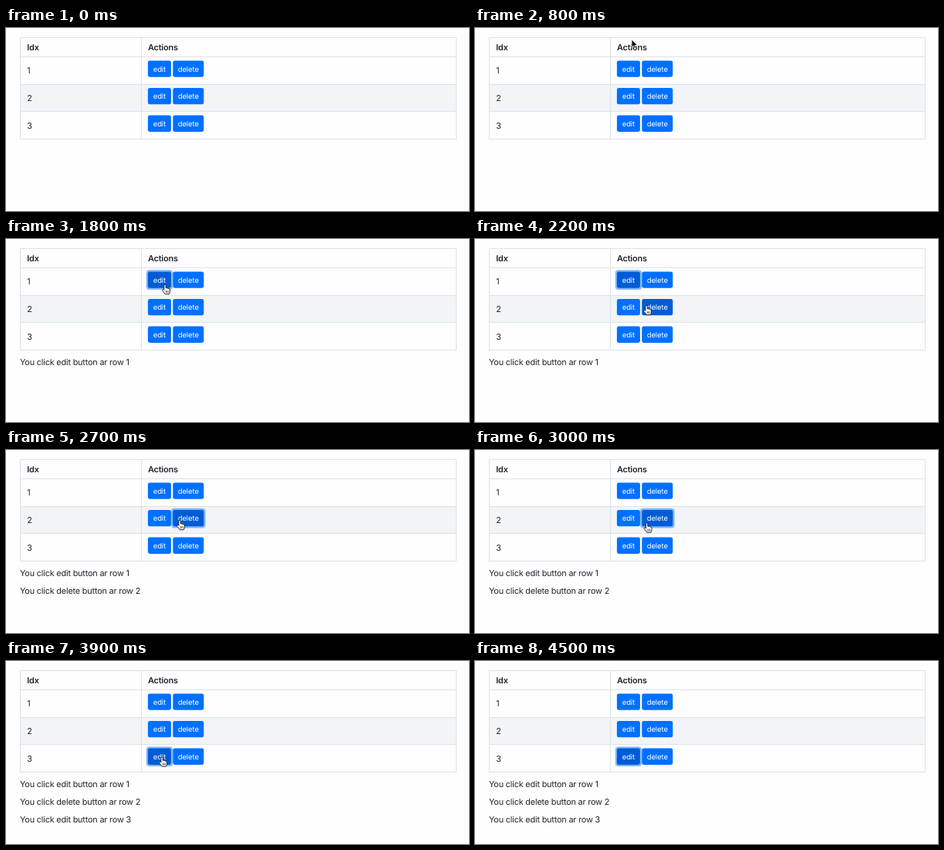
Write an HTML page that moves like this. It is 600 px wide and 238 px high and loops after 4900 ms.

```html
<!DOCTYPE html>
<html lang="en">
<head>
<meta charset="utf-8">
<title>Table actions</title>
<style>
  html, body { margin: 0; width: 100%; height: 100%; overflow: hidden; background: #fefdff; }
  svg { display: block; width: 600px; height: 238px; }
  text {
    font: 10.9px Inter, Roboto, sans-serif;
    letter-spacing: -.2px;
    fill: #212529;
    text-rendering: geometricPrecision;
  }
  .head { font-weight: 600; }
  .label { font-size: 9.5px; letter-spacing: -.1px; fill: #fff; text-anchor: middle; }
  .grid { fill: none; stroke: #dbe4e8; }
  .stripe { fill: #f2f4f7; }
  .button { fill: #0070ff; }
  .button.active { fill: #005cd6; }
  .ring { fill: #0070ff; fill-opacity: .48; }
  .cursor { stroke-linejoin: round; stroke-linecap: round; }
</style>
</head>
<body>
<svg id="stage" viewBox="0 0 600 238"></svg>
<script>
const LOOP = 4900;
const STEP = 100;
const ROWS = 3;
const ROW_HEIGHT = 35.6;
const stage = document.getElementById('stage');

function add(tag, attrs, parent = stage) {
  const node = document.createElementNS('http://www.w3.org/2000/svg', tag);
  for (const key in attrs) node.setAttribute(key, attrs[key]);
  parent.append(node);
  return node;
}

function write(x, y, content, cls = '') {
  const node = add('text', { x, y, class: cls });
  node.textContent = content;
  return node;
}

const show = (node, on) => node.setAttribute('visibility', on ? 'visible' : 'hidden');

// Table
const lineY = i => Math.round(37.1 + ROW_HEIGHT * i) + .5;
add('rect', { x: 18, y: lineY(1), width: 566, height: lineY(2) - lineY(1), class: 'stripe' });
let grid = `M18.5 12.5H583.5V${lineY(ROWS)}H18.5ZM175.5 12.5V${lineY(ROWS)}`;
for (let i = 0; i < ROWS; i++) grid += `M18.5 ${lineY(i)}H583.5`;
add('path', { d: grid, class: 'grid' });
write(27.3, 29.4, 'Idx', 'head');
write(184, 29.4, 'Actions', 'head');

// Buttons, keyed by action and row
const actions = [
  { name: 'edit', x: 183.9, width: 30 },
  { name: 'delete', x: 216.3, width: 40 }
];
const buttons = [];
for (let row = 1; row <= ROWS; row++) {
  const y = 42.4 + (row - 1) * ROW_HEIGHT;
  const height = 21.3;
  const spread = 2.2;
  write(27.3, y + 16.9, row);
  for (const { name, x, width } of actions) {
    const ring = add('rect', {
      x: x - spread, y: y - spread, width: width + 2 * spread, height: height + 2 * spread,
      rx: 4, class: 'ring'
    });
    const face = add('rect', { x, y, width, height, rx: 2.4 });
    write(x + width / 2, y + 14.2, name, 'label');
    buttons.push({ key: name + row, x, y, width, height, ring, face });
  }
}

// Clicks: focus moves on press, the message follows one step later
const clicks = [
  { press: 1400, name: 'edit', row: 1 },
  { press: 2400, name: 'delete', row: 2 },
  { press: 3500, name: 'edit', row: 3 }
];
clicks.forEach((click, i) => {
  click.line = write(18, 164 + i * 23.2, `You click ${click.name} button ar row ${click.row}`);
});

// Cursors, with the hot spot at 0,0
const hand = add('g', { class: 'cursor' });
add('path', {
  d: 'M-1.2 6.5V1A1.2 1.2 0 0 1 1.2 1V4.3Q2.3 3.7 3.1 4.6Q4.3 4.2 4.9 5.2Q6.4 5 6.4 6.5V8.5Q6.4 10.5 5.4 12.2H.2Q-1 10-3.3 7.7Q-3.9 6.5-2.7 6Q-1.9 5.8-1.2 6.5Z',
  fill: '#fff', stroke: '#111', 'stroke-width': .9
}, hand);
add('path', { d: 'M1.2 8V10.3M2.7 8V10.3M4.2 8V10.3', stroke: '#111', 'stroke-width': .6 }, hand);

const arrow = add('path', {
  d: 'M0 0V10.4L2.4 8.2L4 12L5.8 11.2L4.2 7.6H7.4Z',
  fill: '#111', stroke: '#fff', 'stroke-width': .8, class: 'cursor'
});

// Pointer: enters above the table, eases from stop to stop, leaves below it
const entry = { time: 800, x: 203, y: 15 };
const moves = [
  { from: 800, to: 1200, x: 199, y: 49.5 },
  { from: 1500, to: 1800, x: 206, y: 59.5 },
  { from: 1900, to: 2300, x: 225, y: 91.5 },
  { from: 2900, to: 3400, x: 202, y: 125 },
  { from: 4200, to: 4500, x: 202, y: 195 }
];
const exit = moves.at(-1).to;
const ease = p => p * p * (3 - 2 * p);

function pointerAt(time) {
  let { x, y } = entry;
  for (const move of moves) {
    const p = Math.min(1, Math.max(0, (time - move.from) / (move.to - move.from)));
    x += (move.x - x) * ease(p);
    y += (move.y - y) * ease(p);
  }
  return { x, y, visible: time >= entry.time && time < exit };
}

function draw(time) {
  const { x, y, visible } = pointerAt(time);
  const last = clicks.findLast(click => click.press <= time);
  const focus = last && last.name + last.row;
  let hovering = false;

  for (const b of buttons) {
    const over = visible && x >= b.x && x <= b.x + b.width && y >= b.y && y <= b.y + b.height;
    const focused = b.key === focus;
    hovering ||= over;
    show(b.ring, focused);
    b.face.setAttribute('class', over || focused ? 'button active' : 'button');
  }
  for (const click of clicks) show(click.line, time >= click.press + STEP);

  show(hand, visible && hovering);
  show(arrow, visible && !hovering);
  for (const cursor of [hand, arrow]) cursor.setAttribute('transform', `translate(${x} ${y})`);
}

const start = performance.now();
function tick() {
  const time = (performance.now() - start) % LOOP;
  draw(Math.floor(time / STEP) * STEP);
  requestAnimationFrame(tick);
}
tick();
</script>
</body>
</html>
```
